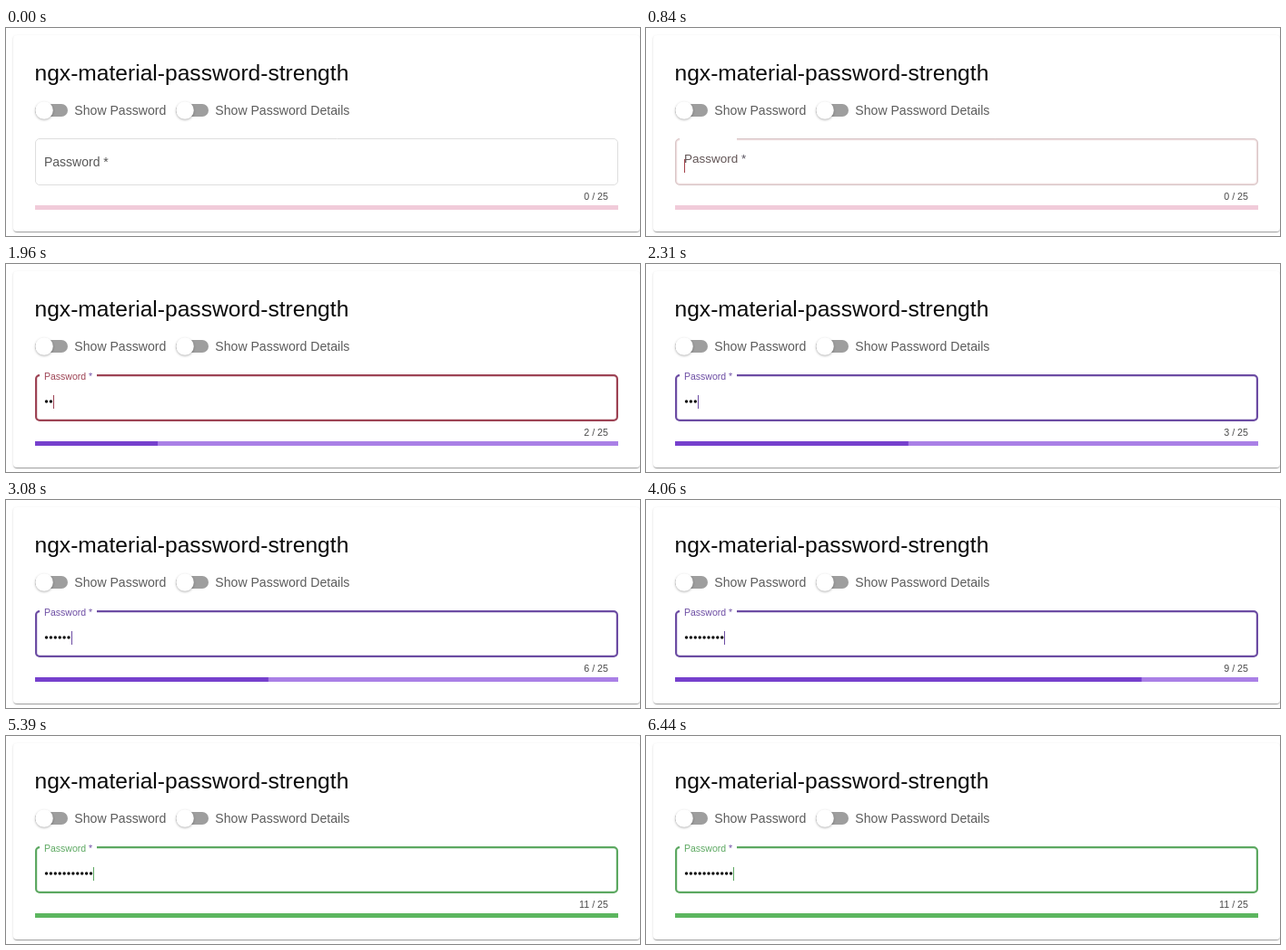
These frames come from a looping animation (698x230 px, 6.51 s). An HTML page with a canvas:

```html
<!DOCTYPE html>
<html lang="en">
<head>
<meta charset="utf-8">
<title>Password strength</title>
<style>
  html, body { margin: 0; width: 100%; height: 100%; overflow: hidden; background: #fff; }
  .card {
    position: absolute; left: 8px; top: 8px; width: 690px; height: 217px;
    border-radius: 4px; background: #fff;
    box-shadow: 0 2px 1px -1px rgba(0,0,0,.2), 0 1px 1px rgba(0,0,0,.14), 0 1px 3px rgba(0,0,0,.12);
  }
  canvas { position: absolute; left: 0; top: 0; width: 698px; height: 230px; }
</style>
</head>
<body>
<div class="card"></div>
<canvas></canvas>
<script>
const W = 698, H = 230, LOOP = 6510, STEP = 70, LAG = 17;
const FOCUS = 840;
const KEYS = [1260, 1960, 2310, 2660, 3010, 3080, 3500, 3780, 4060, 4270, 4340];
const LEVELS = [[1260, 20], [1960, 40], [3500, 60], [3780, 80], [4270, 100]];
const CARET_OFF = [[1820, 1960], [4900, 5390], [5950, 6440]];

const WARN = { line: [163, 66, 74], fill: '#b63a41', track: '#f1cbd9' };
const ACCENT = { line: [108, 76, 163], fill: '#7640cd', track: '#aa80e6' };
const GOOD = { line: [92, 168, 97], fill: '#5cb65f', track: '#cfe9d0' };
const GREY = [88, 88, 88];

const canvas = document.querySelector('canvas');
const ctx = canvas.getContext('2d');
const dpr = window.devicePixelRatio || 1;
canvas.width = W * dpr;
canvas.height = H * dpr;
ctx.scale(dpr, dpr);

function bezier(x1, y1, x2, y2) {
  const at = (a, b, s) => 3 * a * s * (1 - s) ** 2 + 3 * b * s * s * (1 - s) + s ** 3;
  return x => {
    if (x <= 0) return 0;
    if (x >= 1) return 1;
    let lo = 0, hi = 1;
    for (let i = 0; i < 24; i++) {
      const mid = (lo + hi) / 2;
      if (at(x1, x2, mid) < x) lo = mid; else hi = mid;
    }
    return at(y1, y2, lo);
  };
}
const ease = bezier(.25, .1, .25, 1);
const swift = bezier(.25, .8, .25, 1);

const lerp = (a, b, k) => a + (b - a) * k;
const mix = (a, b, k) => a.map((v, i) => lerp(v, b[i], k));
const rgb = c => `rgb(${c.map(Math.round).join(',')})`;

// Progress of a transition triggered at `from`, slightly under way when first seen.
const run = (t, from, ms, curve) => t < from ? 0 : curve((t - from + LAG) / ms);

const theme = level => level <= 20 ? WARN : level <= 80 ? ACCENT : GOOD;

function text(str, x, y, size, color, align = 'left') {
  ctx.font = `${size}px "Liberation Sans", Arial, sans-serif`;
  ctx.textAlign = align;
  ctx.fillStyle = color;
  ctx.fillText(str, x, y);
}

function disc(x, y, r, color) {
  ctx.fillStyle = color;
  ctx.beginPath();
  ctx.arc(x, y, r, 0, Math.PI * 2);
  ctx.fill();
}

function toggle(x, label) {
  ctx.fillStyle = '#9e9e9e';
  ctx.beginPath();
  ctx.roundRect(x, 84, 36, 14, 7);
  ctx.fill();
  ctx.save();
  ctx.shadowColor = 'rgba(0,0,0,.3)';
  ctx.shadowBlur = 2.5 * dpr;
  ctx.shadowOffsetY = dpr;
  disc(x + 10, 91, 9.8, '#fff');
  ctx.restore();
  text(label, x + 43.3, 96, 14.1, '#5c5c5c');
}

// Field border, with an opening in the top edge when `gap` is set.
function outline(width, color, alpha, gap) {
  const l = 32 + width / 2, r = 706 - l, t = 90 + l, b = 206 - l, rad = 37 - l;
  ctx.save();
  ctx.globalAlpha = alpha;
  ctx.strokeStyle = color;
  ctx.lineWidth = width;
  ctx.beginPath();
  ctx.moveTo(gap ? 100 : 60, t);
  ctx.arcTo(r, t, r, b, rad);
  ctx.arcTo(r, b, l, b, rad);
  ctx.arcTo(l, b, l, t, rad);
  ctx.arcTo(l, t, r, t, rad);
  if (gap) ctx.lineTo(37, t); else ctx.closePath();
  ctx.stroke();
  ctx.restore();
}

function field(t, count, line) {
  const focused = t >= FOCUS;
  const thick = run(t, FOCUS, 300, swift);
  const float = run(t, FOCUS, 400, swift);
  if (thick < 1) outline(1, '#dedede', 1 - thick, focused);
  if (thick > 0) outline(2.2, rgb(line), thick, true);

  const size = lerp(14, 10.5, float), y = lerp(153, 127.5, float);
  text('Password ', 42, y, size, rgb(mix(GREY, line, float)));
  const starX = 42 + ctx.measureText('Password ').width;
  text('*', starX, y, size, rgb(mix(GREY, ACCENT.line, float)));

  for (let i = 0; i < count; i++) disc(44.5 + 4.9 * i, 152, 1.75, '#111');
  if (focused && !CARET_OFF.some(([a, b]) => t >= a && t < b)) {
    ctx.fillStyle = rgb(line);
    ctx.fillRect(Math.round(42.2 + 4.9 * count), 145, 1, 15);
  }
  text(`${count} / 25`, 663, 190, 10.7, '#4a4a4a', 'right');
}

function draw(t) {
  let level = 0, bar = 0, line = WARN.line;
  for (const [at, next] of LEVELS) {
    if (t < at) break;
    bar = lerp(level, next, run(t, at, 250, ease));
    line = mix(theme(level).line, theme(next).line, run(t, at, 150, ease));
    level = next;
  }
  const count = KEYS.filter(k => t >= k).length;
  const { fill, track } = theme(level);

  ctx.clearRect(0, 0, W, H);
  text('ngx-material-password-strength', 31.5, 58, 24.6, '#0a0a0a');
  toggle(32, 'Show Password');
  toggle(187, 'Show Password Details');
  field(t, count, line);

  ctx.fillStyle = track;
  ctx.fillRect(32, 196, 642, 5);
  ctx.fillStyle = fill;
  ctx.fillRect(32, 196, 6.42 * bar, 5);
}

const start = performance.now();
function tick() {
  const t = (performance.now() - start) % LOOP;
  draw(Math.floor(t / STEP) * STEP);
  requestAnimationFrame(tick);
}
tick();
</script>
</body>
</html>
```
